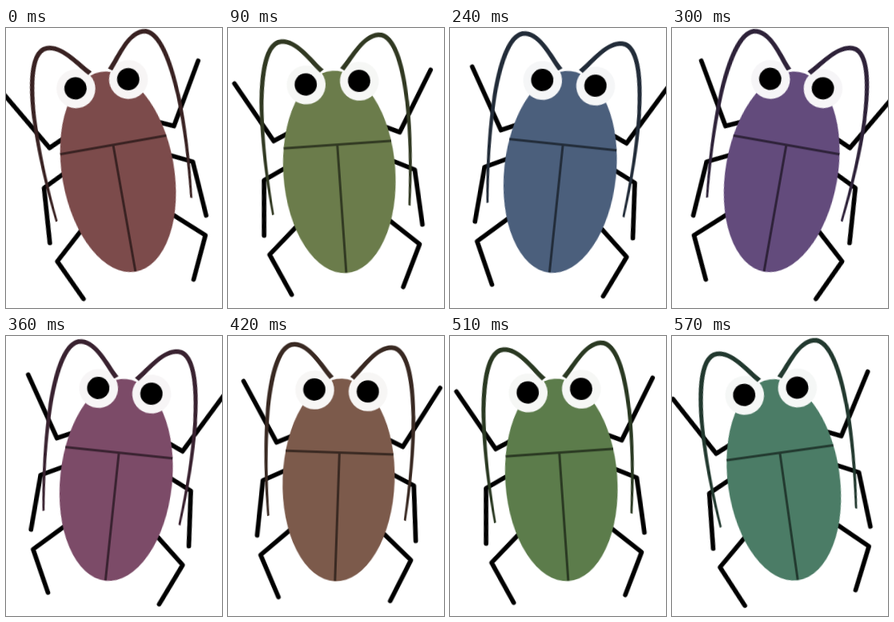
An HTML page for the animation above (0.6 s loop, 270x350 px).

```html
<!DOCTYPE html>
<html lang="en">
<head>
<meta charset="utf-8">
<title>Wiggling beetle</title>
<style>
  @property --hue {
    syntax: "<number>";
    inherits: true;
    initial-value: 0;
  }
  html, body {
    margin: 0;
    width: 100%;
    height: 100%;
    overflow: hidden;
    background: #fff;
  }
  svg {
    display: block;
    width: 100%;
    height: 100%;
  }
  .beetle {
    transform-origin: 138.4px 171.5px;
    animation: wiggle 600ms infinite, tint 600ms steps(20) infinite;
  }
  .legs {
    fill: none;
    stroke: #000;
    stroke-width: 5.7;
    stroke-linecap: round;
    stroke-linejoin: round;
  }
  .shell { fill: hsl(var(--hue) 24.5% 39%); }
  .seams {
    fill: none;
    stroke: hsl(var(--hue) 25% 18%);
    stroke-width: 3;
  }
  .feeler { fill: hsl(var(--hue) 25% 18%); }
  .eyes { fill: hsl(var(--hue) 15% 96.5%); }

  /* Ten even steps each way, 2 degrees per step */
  @keyframes wiggle {
    0%, 100% { transform: rotate(-10deg); animation-timing-function: steps(10); }
    50% { transform: rotate(10deg); animation-timing-function: steps(10); }
  }
  /* One and a half turns of the colour wheel per loop */
  @keyframes tint {
    from { --hue: 0; }
    to { --hue: 540; }
  }
</style>
</head>
<body>
<svg viewBox="0 0 270 350">
  <defs>
    <path id="legs" d="M15.5 60.6L59.5 135.7L80 126.3M80 166.3L44 183.7L39.2 252.7M82 242.8L44.4 277L68.5 328.9"/>
    <path id="feeler" d="M128 50.8C114 36.3 98 9.4 77.7 9.4C53 9.4 46.2 60 44.6 98C43.1 140 45.4 180 51 228.2
      L53.6 227.2C49.2 180 47.4 140 49.4 98C51.7 60 59 15.2 77.7 15.2C95 15.2 108 37.3 123 54.3Z"/>
  </defs>
  <g class="beetle">
    <g class="legs">
      <use href="#legs"/>
      <use href="#legs" transform="translate(276.8) scale(-1 1)"/>
    </g>
    <ellipse class="shell" cx="138.6" cy="180" rx="70" ry="126.7"/>
    <path class="seams" d="M71.2 145.7H206M138.4 145.7V306"/>
    <g class="eyes">
      <circle cx="104.8" cy="68.5" r="24.3"/>
      <circle cx="171.5" cy="68.5" r="24.3"/>
    </g>
    <circle cx="104.3" cy="68" r="13.9"/>
    <circle cx="171.2" cy="68.2" r="13.9"/>
    <g class="feeler">
      <use href="#feeler"/>
      <use href="#feeler" transform="rotate(.4 199 12) translate(276.9) scale(-1 1)"/>
    </g>
  </g>
</svg>
</body>
</html>
```
